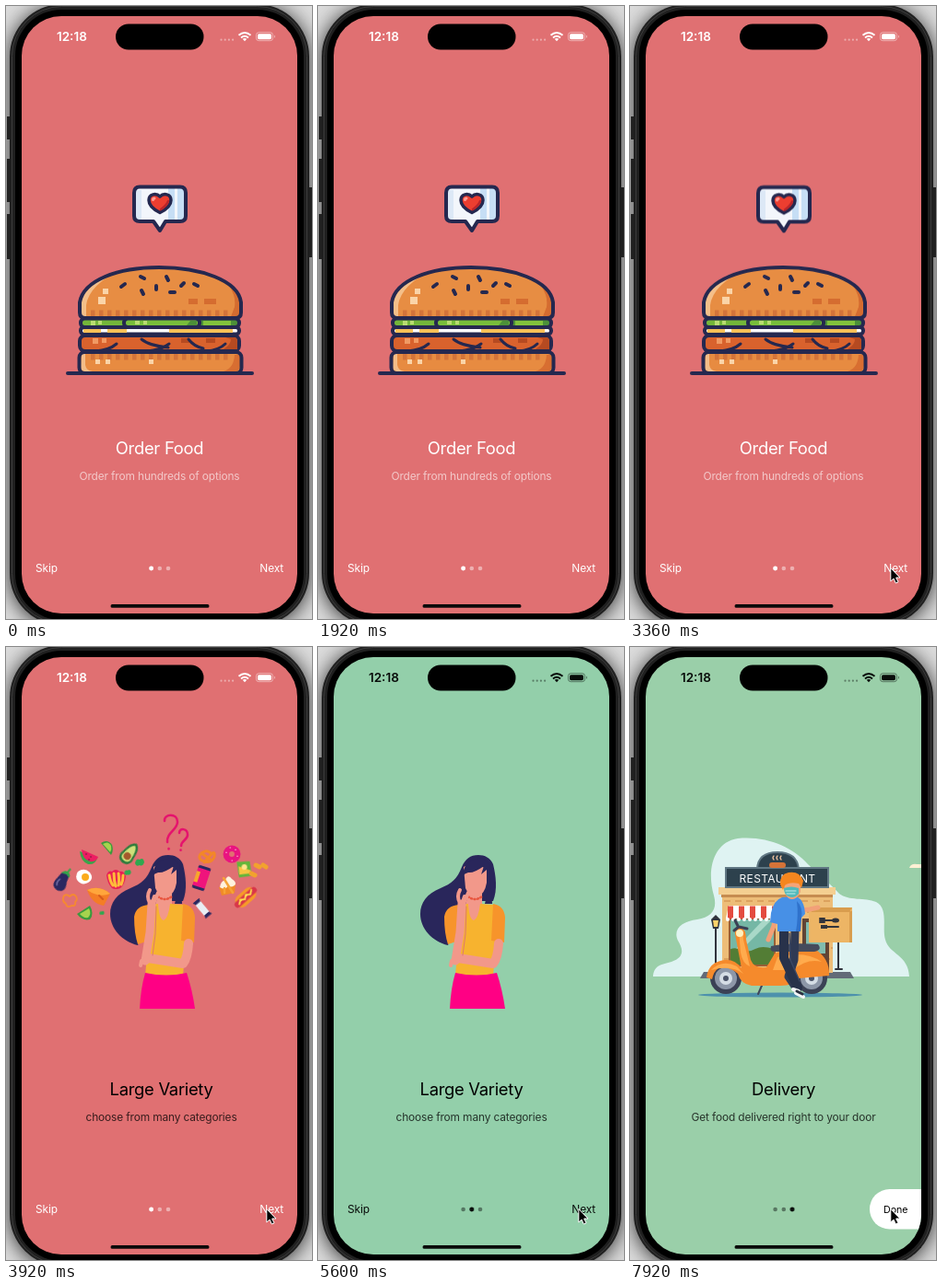
These frames come from a looping animation (332 px wide and 666 px high, 8000 ms). An HTML page:

```html
<!DOCTYPE html>
<html lang="en">
<head>
<meta charset="utf-8">
<title>Onboarding</title>
<style>
html, body { margin: 0; width: 100%; height: 100%; overflow: hidden; background: #999; }
svg { display: block; width: 332px; height: 666px; }
text { font-family: Inter, Roboto, sans-serif; }
.title { font-size: 18.4px; letter-spacing: -.28px; text-anchor: middle; }
.sub { font-size: 11.9px; letter-spacing: -.13px; text-anchor: middle; }
.nav { font-size: 11.9px; letter-spacing: -.1px; fill: currentColor; }
.ink { stroke: #25284f; stroke-width: 4; stroke-linejoin: round; stroke-linecap: round; }
.line { fill: none; stroke-linecap: round; stroke-linejoin: round; }

/* one shared 8 s clock: 1% = 80 ms */
.pages, .bg, .ui, .active, .early, .late, .cursor, .layer, .table, .bubble, .ring, .hair, .food, .ask, .cloud {
  animation: 8s linear infinite;
}
.pages { animation-name: swipe; }
@keyframes swipe {
  0%, 43.75% { transform: none; animation-timing-function: cubic-bezier(.3,0,.1,1); }
  49.75%, 92.5% { transform: translateX(-300px); animation-timing-function: cubic-bezier(.3,0,.1,1); }
  98.5%, 100% { transform: translateX(-600px); }
}
.bg { animation-name: tint; }
@keyframes tint {
  0%, 49.5% { fill: #e07072; }
  55%, 98.2% { fill: #93cfaa; }
  100% { fill: #a2cfa7; }
}
.ui { animation-name: ink; }
@keyframes ink {
  0%, 49.5% { color: #fff; }
  52%, 100% { color: #080c0a; }
}
.active { animation-name: dot; animation-timing-function: step-end; }
@keyframes dot {
  0% { transform: none; }
  49.6% { transform: translateX(9.2px); }
  98.5%, 100% { transform: translateX(18.4px); }
}
.early { animation-name: hide; animation-timing-function: step-end; }
.late { animation-name: show; animation-timing-function: step-end; }
@keyframes hide { 0% { opacity: 1; } 98.5%, 100% { opacity: 0; } }
@keyframes show { 0% { opacity: 0; } 98.5%, 100% { opacity: 1; } }
.cursor { animation-name: point; animation-timing-function: ease-out; }
@keyframes point {
  0%, 24% { transform: translate(60px, 30px); }
  30%, 100% { transform: none; }
}

.layer { animation-name: hop; transform-box: fill-box; transform-origin: center; }
@keyframes hop {
  0%, 10%, 22%, 42% { transform: none; animation-timing-function: ease-out; }
  16%, 48% { transform: translate(var(--x, 0px), var(--y)) rotate(var(--r, 0deg)); animation-timing-function: ease-in; }
  54%, 100% { transform: none; }
}
.table { animation-name: shrink; transform-origin: 167px 399px; }
@keyframes shrink {
  0%, 10%, 22%, 42%, 54%, 100% { transform: none; }
  16%, 48% { transform: scaleX(.89); }
}
.bubble { animation-name: bob; animation-timing-function: ease-in-out; }
@keyframes bob {
  0%, 24%, 40%, 100% { transform: translateY(-3px); }
  16%, 32%, 48% { transform: none; }
}
.ring { animation-name: burst; transform-box: fill-box; transform-origin: center; animation-timing-function: ease-out; }
@keyframes burst {
  0%, 28% { transform: scale(.15); opacity: 0; }
  28.5% { transform: scale(.2); opacity: 1; }
  32%, 33% { transform: none; opacity: 1; }
  36%, 100% { transform: scale(1.15); opacity: 0; }
}

.hair { animation-name: sway; transform-origin: 178px 240px; animation-timing-function: ease-in-out; }
@keyframes sway {
  0%, 49%, 70%, 100% { transform: none; }
  60%, 90% { transform: scaleX(1.07); }
}
.food { animation-name: pop; animation-delay: calc(var(--d) * -1ms); }
@keyframes pop {
  0%, 61% { transform: none; animation-timing-function: ease-in; }
  66%, 83% { transform: scale(0); animation-timing-function: cubic-bezier(.3,1.4,.6,1); }
  89%, 100% { transform: none; }
}
.ask { animation-name: fade; }
@keyframes fade { 0%, 53% { opacity: 1; } 57%, 100% { opacity: 0; } }
.cloud { animation-name: drift; }
@keyframes drift { 0%, 97% { transform: translateX(8px); } 99% { transform: none; } 100% { transform: translateX(-4px); } }
</style>
</head>
<body>
<svg viewBox="0 0 332 666" xmlns="http://www.w3.org/2000/svg">
  <defs>
    <clipPath id="screen"><rect x="17" y="11" width="299" height="649" rx="43"/></clipPath>
    <clipPath id="pane"><rect x="109" y="296" width="47" height="49"/></clipPath>
    <clipPath id="bun"><path d="M81 339V322C84 298 121 284 166 284S252 298 255 322V332Q255 339 248 339Z"/></clipPath>
    <filter id="soft" x="-20%" y="-20%" width="140%" height="140%"><feGaussianBlur stdDeviation="11"/></filter>
    <g id="leaf"><path fill="#2fa84f" d="M-5 1Q-4-5 0-3Q4-6 5 0Q3 5 0 3Q-4 5-5 1Z"/></g>
    <g id="wheel"><circle r="17" fill="#3b4155"/><circle r="12" fill="#8d97a8"/><circle r="7" fill="#d5dde5"/><circle r="3" fill="#4b5368"/></g>
  </defs>

  <rect width="332" height="666" fill="#dcdcdc"/>
  <rect x="4" y="0" width="325" height="675" rx="57" opacity=".8" filter="url(#soft)"/>
  <g fill="#202020">
    <path d="M1 120H6V145H1ZM1 166H6V213H1ZM1 226H6V275H1ZM327 197H332V273H327Z"/>
    <rect x="4" y="-2" width="325" height="675" rx="57"/>
  </g>
  <rect x="6.5" y=".5" width="320" height="670" rx="54" fill="none" stroke="#3c3c3c" stroke-width="1"/>
  <rect x="10" y="4" width="313" height="663" rx="50" fill="#000"/>

  <g clip-path="url(#screen)">
    <rect class="bg" x="17" y="11" width="299" height="649" fill="#e07072"/>

    <g class="pages">
      <!-- burger -->
      <g>
        <g class="bubble">
          <path fill="#f3f6fb" d="M144 200H190Q194 200 194 205V232Q194 236 189 236H173L167 247L160 236H144Q139 236 139 231V205Q139 200 144 200Z"/>
          <path fill="#c6def5" d="M176 200H183V236H176ZM186 200H190Q195 200 195 205V231Q195 236 190 236H186Z"/>
          <path fill="#dce8f6" d="M140 203H147V236H140Z"/>
          <path class="ink" fill="none" d="M145 199.500H189Q195 199.500 195 206V231Q195 237 189 237H173L167 247L160 237H145Q139 237 139 231V206Q139 199.500 145 199.500Z"/>
          <path class="ink" style="stroke-width:3.500" fill="#ec3e30" d="M167 227.500C160 224 155 219 155 214C155 207 163 206 167 210C171 206 179 207 179 214C179 219 174 224 167 227.500Z"/>
          <path class="line" stroke="#ff9b92" stroke-width="3" d="M159.500 213.500Q159.500 212 161 212"/>
          <path class="line" stroke="#b9252a" stroke-width="2.500" d="M176 215Q174 220 168 224"/>
        </g>
        <g class="line" stroke="#25284f" stroke-width="4">
          <circle class="ring" cx="88" cy="238" r="19" pathLength="8" stroke-dasharray="0 1"/>
          <circle class="ring" cx="245.500" cy="238" r="19" pathLength="8" stroke-dasharray="0 1"/>
        </g>
        <path class="ink table" d="M67 399H267"/>
        <g class="layer" style="--y:-9.500px">
          <rect x="80" y="376" width="175" height="23" rx="6" fill="#e78b41"/>
          <path fill="#f3bd89" d="M82 378H86V390Q87 396 94 397H86Q81 397 81 391Z"/>
          <path fill="#d86e31" d="M254 379V391Q253 398 246 398H232Q247 396 248 379Z"/>
          <path class="line" stroke="#d4743a" stroke-width="7" style="stroke-linecap:butt" stroke-dasharray="4.500 4.500" d="M92 381H242"/>
          <path fill="#fad4a8" d="M97 384h5v5h-5ZM108 384h5v5h-5ZM155 384h5v5h-5Z"/>
          <rect class="ink" x="79.500" y="376" width="176" height="23" rx="6" fill="none"/>
        </g>
        <g class="layer" style="--y:-14.500px">
          <rect class="ink" x="80" y="358" width="173" height="17" rx="6" fill="#d9622d"/>
          <path fill="#b64a21" d="M190 361H199V366H190ZM217 361H227V366H217ZM238 360H248Q251 360 251 366V373H236Q244 368 244 362Z"/>
          <path fill="#f19a63" d="M94 361h6v6h-6ZM104 361h5v5h-5Z"/>
          <path class="ink line" style="stroke-width:3" d="M97 375Q112 374 120 367M147 362Q155 369 176 371M153 375Q168 374 177 367M198 362Q204 370 214 372M217 375Q231 374 238 367"/>
        </g>
        <g class="layer" style="--y:-10.500px;--r:-1.500deg">
          <rect class="ink" x="81" y="349" width="172" height="7.500" rx="3.500" fill="#fff"/>
          <path fill="#f8c057" d="M84 351H103V355H84ZM110 351H131V355H110ZM177 351H246V355H177Z"/>
        </g>
        <g class="layer" style="--y:-17px;--r:-6deg">
          <rect class="ink" x="81" y="339.500" width="88" height="9.500" rx="4.500" fill="#74b63a"/>
          <path fill="#b9dd72" d="M92 342h5v5h-5ZM100 342h4v4h-4Z"/>
        </g>
        <g class="layer" style="--y:-13px">
          <rect class="ink" x="165" y="339.500" width="88" height="9.500" rx="4.500" fill="#4c9039"/>
          <path fill="#82c23c" d="M214 342H244V347H214Z"/>
        </g>
        <g class="layer" style="--y:-14px">
          <rect class="ink" x="128" y="339.500" width="82" height="9.500" rx="4.500" fill="#78be3b"/>
          <path fill="#b9dd72" d="M140 342h5v4h-5ZM149 342h4v4h-4Z"/>
          <path fill="#4c9039" d="M200 342H207V347H196Z"/>
        </g>
        <g class="layer" style="--x:1.800px;--y:-20px;--r:1.800deg">
          <g clip-path="url(#bun)">
            <rect x="78" y="282" width="180" height="60" fill="#e78d43"/>
            <path fill="#f4bf8a" d="M80 340V318Q90 292 125 286Q90 303 87 325V340Z"/>
            <path fill="#d56c30" d="M225 288Q251 306 248 327L243 340H258V300Z"/>
            <path stroke="#d4743a" stroke-width="7" stroke-dasharray="4.500 4.500" d="M92 334H242"/>
          </g>
          <path fill="#fad4a8" d="M105 307h6v6h-6ZM100 316h8v8h-8Z"/>
          <path fill="#d56c30" d="M198 318h10v6h-10ZM215 318h13v6h-13Z"/>
          <path class="ink line" d="M125 305L129 302M146 294L150 296M147 309L149 313M163 304V308M174 294L176 298M178 311H183M190 304L193 301M204 302L208 304"/>
          <path class="ink" fill="none" d="M80 333V322C84 298 121 284 166 284S252 298 255 322V333Q255 339 249 339H86Q80 339 80 333Z"/>
        </g>
        <text class="title" x="166.500" y="487" fill="#fff">Order Food</text>
        <text class="sub" x="166.500" y="515" fill="#fff" fill-opacity=".62">Order from hundreds of options</text>
      </g>

      <!-- variety -->
      <g transform="translate(300 0)">
        <g class="ask line" stroke="#e5126d" stroke-width="2.500">
          <path d="M170 189C169 181 184 180 184 190C184 199 172 201 173 212M174.500 219v.5"/>
          <path d="M186 202C186 196 195 197 195 204C195 210 188 210 188 216M187.500 220.500v.2"/>
        </g>
        <g transform="translate(88 227)"><g class="food" style="--d:380">
          <path fill="#3aa54a" d="M-10-5L9 2Q7 10-1 9Q-9 6-10-5Z"/><path fill="#ec1e62" d="M-8-7L10 1Q8 7 1 6Q-7 4-8-7Z"/>
          <path class="line" stroke="#5a1739" stroke-width="1.500" d="M-3-2v.1M2 1v.1M0 4v.1"/></g></g>
        <g transform="translate(107 218)"><g class="food" style="--d:120">
          <path fill="#389a3c" d="M-6-5Q1-10 6-3Q8 4 5 8Z"/><path fill="#a6d34e" d="M-4-4Q2-8 5-2Q6 2 4 5Z"/></g></g>
        <g transform="translate(132 224) rotate(38)"><g class="food" style="--d:300">
          <path fill="#2d7c3c" d="M0-13Q6-11 7 1Q10 12 0 13Q-10 12-7 1Q-6-11 0-13Z"/><path fill="#cfe07a" d="M0-10Q4-8 5 2Q7 10 0 10Q-7 10-5 2Q-4-8 0-10Z"/><circle cy="4" r="4" fill="#a5592b"/></g></g>
        <g transform="translate(60 252) rotate(28)"><g class="food" style="--d:340">
          <path fill="#2b2860" d="M0-9Q5-7 5 1Q10 13 0 14Q-10 13-6 1Q-5-7 0-9Z"/><path fill="#35a34a" d="M-5-5Q-2-10 0-9L1-14L3-13L2-9Q6-7 5-4L1-6Z"/><path class="line" stroke="#7771a7" stroke-width="1.500" d="M-3 2Q-5 6-3 9"/></g></g>
        <g transform="translate(83 249)"><g class="food" style="--d:260">
          <path fill="#fff" d="M-7-5Q0-10 6-4Q11 3 4 7Q-3 11-8 4Q-10-1-7-5Z"/><circle cx="1" cy="1" r="4" fill="#fbab1c"/></g></g>
        <g transform="translate(117 252)"><g class="food" style="--d:60">
          <path fill="#e91d55" d="M-10-4Q-8-10-4-8Q0-12 4-8Q9-9 11-3Q10 6 5 10Q0 12-4 10Q-9 5-10-4Z"/>
          <path class="line" stroke="#ffbd3a" stroke-width="3" d="M-7-4Q-6 3-3 7M-2-6Q-2 2 0 8M3-6Q4 2 3 7M8-4Q8 2 6 6"/></g></g>
        <g transform="translate(67 275)"><g class="food" style="--d:240">
          <path class="line" stroke="#f58a31" stroke-width="1.800" d="M-6-5Q-3-7 0-4Q4-8 7-4Q9 0 6 2Q7 7 2 6Q-3 9-4 4Q-9 1-6-5Z"/></g></g>
        <g transform="translate(99 270)"><g class="food" style="--d:140">
          <path fill="#f47d25" d="M-13-6Q0-12 12-2L5 11Q-8 9-13-6Z"/><path fill="#ffa63c" d="M-13-6Q0-12 12-2Q0 3-13-6Z"/><path class="line" stroke="#d65a1c" stroke-width="2" d="M0 0L4 4"/></g></g>
        <g transform="translate(84 289)"><g class="food" style="--d:200">
          <path fill="#389a3c" d="M-9 1L5-8Q10 1 5 7Q-3 9-9 1Z"/><path fill="#a6d34e" d="M-6 1L4-5Q7 1 3 5Q-2 6-6 1Z"/></g></g>
        <g transform="translate(143 234)"><g class="food" style="--d:20"><use href="#leaf"/></g></g>
        <g transform="translate(130 245) scale(.75)"><g class="food" style="--d:40"><use href="#leaf"/></g></g>
        <g transform="translate(102 289) scale(.55)"><g class="food" style="--d:80"><use href="#leaf"/></g></g>
        <g transform="translate(216 228)"><g class="food" style="--d:280">
          <path class="line" stroke="#f38728" stroke-width="3" d="M-3 6L5-3Q9-7 8 0Q5 7-2 5Q-9 4-8-1Q-7-5-3-2L5 4M-6-4Q0-9 5-3"/></g></g>
        <g transform="translate(243 225)"><g class="food" style="--d:360">
          <circle r="6.200" fill="none" stroke="#e91480" stroke-width="6.500"/><path class="line" stroke="#ffc3dd" stroke-width="1.200" d="M-6-2v.5M-2-7h.5M4-5v.5M6 2v.5M0 7h.5"/></g></g>
        <g transform="translate(210 251) rotate(18)"><g class="food" style="--d:160">
          <rect x="-7" y="-13" width="14" height="26" rx="2" fill="#2b2860"/><rect x="-7" y="-10" width="14" height="20" fill="#ef147c"/><path fill="#f7a62c" d="M-7-6H-3V6H-7Z"/></g></g>
        <g transform="translate(238 258)"><g class="food" style="--d:220">
          <path fill="#f08b27" d="M-9 3L9-1L8 9L-6 12Z"/><path fill="#fff2de" d="M-8 3Q-7-4-2-5Q1-12 5-6Q11-2 8 1Q3 4 1 1Q-2 7-8 3Z"/><path class="line" stroke="#f6a335" stroke-width="2.500" d="M-4-7L6 9M-3 4V9"/></g></g>
        <g transform="translate(257 241) rotate(-12)"><g class="food" style="--d:320">
          <path fill="#62b63a" d="M-7-9L7-7L6 9L-8 8Z"/><path fill="#f8c642" d="M-6-4L6 3L5 6L-7 5Z"/><circle cy="-2" r="3" fill="#ffe58a"/></g></g>
        <g transform="translate(273 240)"><g class="food" style="--d:300">
          <path class="line" stroke="#f2a22e" stroke-width="5" d="M-9 6L-5 8M-4-3L0-1M4-3L7-1"/></g></g>
        <g transform="translate(258 272) rotate(-42)"><g class="food" style="--d:260">
          <rect x="-13" y="-7" width="26" height="14" rx="7" fill="#f69a29"/><rect x="-15" y="-3.500" width="30" height="7" rx="3.500" fill="#d93649"/><path class="line" stroke="#ffe04f" stroke-width="1.800" d="M-10 1L-6-2L-2 1L2-2L6 1L10-2"/></g></g>
        <g transform="translate(211 284) rotate(50) scale(.9)"><g class="food" style="--d:100">
          <path fill="#2b2860" d="M-12-5L-7-3H7L12-5V5L7 3H-7L-12 5Z"/><rect x="-8" y="-4" width="16" height="8" fill="#e9eef4"/></g></g>

        <path class="hair" fill="#29265b" d="M174 226C165 226 160 230 156 239C151 252 145 257 133 262C118 268 111 278 111 290C111 306 124 320 141 324L155 297L169 276H190C195 264 193 248 190 236C187 229 181 226 174 226Z"/>
        <path fill="#f2988a" d="M164 265H178V281Q175 299 168 299Q162 296 160 280Z"/>
        <path fill="#f7b32f" d="M155 280L163 279Q164 296 169 297Q174 295 176 279L191 280Q195 312 192 333L190 357H149L152 322Z"/>
        <path fill="#f7942b" d="M153 280Q139 281 137 293Q137 311 141 323L153 319ZM190 279Q202 281 203 294L202 321L188 319Z"/>
        <path fill="#f2988a" d="M158 239Q161 237 172 236L183 241V256Q181 268 173 272Q164 272 160 262Z"/>
        <path fill="#29265b" d="M157 249Q158 234 169 231L178 229L186 236L189 279H181Q185 265 183 252V242L177 247L180 238Q169 246 163 245Q159 246 157 249Z"/>
        <path class="line" stroke="#e8563f" stroke-width="2.500" stroke-dasharray="1 2.600" d="M163 271Q170 277 178 271"/>
        <path fill="#ff0084" d="M149 354Q172 359 194 354Q200 372 203 393H143Q144 371 149 354Z"/>
        <path class="line" stroke="#f2988a" stroke-width="10" d="M196 322Q195 338 190 344L152 338"/>
        <path class="line" stroke="#f2988a" stroke-width="9" d="M149 341L154 310L156 279"/>
        <path class="line" stroke="#f2988a" stroke-width="4" d="M154 278Q150 271 154 264M158 279L163 267M157 277L159 271M153 337L145 341L144 346"/>
        <path class="line" stroke="#dd796f" stroke-width="1" d="M157 335L160 312L161 282"/>
        <text class="title" x="166.500" y="487">Large Variety</text>
        <text class="sub" x="166.500" y="515" fill-opacity=".75">choose from many categories</text>
      </g>

      <!-- delivery -->
      <g transform="translate(600 0)">
        <path fill="#dff3f2" d="M25 358C26 345 35 345 45 342C59 337 58 329 52 319C46 306 57 298 73 296C89 293 95 285 91 270C83 243 90 212 117 208C148 205 176 217 193 236C208 250 217 257 227 268C237 276 255 272 267 277C281 284 273 306 277 318C281 334 302 334 303 358Z"/>
        <path class="cloud" fill="#fff0d4" d="M303 240Q305 235 311 236H326V240Z"/>
        <path fill="#626b78" d="M80 353H239L243 360H76Z"/>
        <path fill="#edbd78" d="M100 264H220V354H100Z"/>
        <path stroke="#dca25e" stroke-width="2" stroke-dasharray="7 5" d="M102 276H220M108 288H220M158 327H220M102 339H220"/>
        <path fill="#f4cf91" d="M96 261H223V269H96Z"/>
        <path fill="#c68c50" d="M99 269H220V272H99Z"/>
        <path fill="#2d414d" stroke="#607783" stroke-width="2" d="M138 241Q139 223 160 223T183 241Z"/>
        <rect x="104" y="240" width="111" height="21" fill="#2d414d" stroke="#607783" stroke-width="2"/>
        <path class="line" stroke="#d57338" stroke-width="6" d="M154 237H166"/>
        <path class="line" stroke="#f2c4a0" stroke-width="1.200" d="M156 231Q154 229 156 227M160 231Q158 229 160 227M164 231Q162 229 164 227"/>
        <text x="160" y="255.500" font-size="12" letter-spacing=".4" text-anchor="middle" fill="#fff">RESTAURANT</text>
        <rect x="107" y="294" width="51" height="53" fill="#985f37"/>
        <g clip-path="url(#pane)"><rect x="109" y="296" width="47" height="49" fill="#75b7a5"/><path fill="#a9d8c8" d="M113 330L145 296H154L120 330Z"/><path fill="#537d35" d="M106 330Q113 325 120 329T136 328T160 330V346H106Z"/></g>
        <path fill="#fff" d="M107 281H156L159 295H104Z"/>
        <path stroke="#e44b3f" stroke-width="14" stroke-dasharray="6 6" d="M106 288.500H158"/>
        <path class="line" stroke="#fff" stroke-width="4" stroke-dasharray="0 6" d="M106 296H158"/>
        <path fill="#614435" d="M187 295H216V353H187Z"/>
        <path fill="#81bcae" d="M191 299H212V333H191Z"/>
        <path class="line" stroke="#30343d" stroke-width="2" d="M93 304V348M90 348H96M226 320V350M223 350H230"/>
        <path fill="#30343d" d="M88 296L93 291L98 296L96 306H90Z"/><path fill="#ffd36a" d="M90 297H96L95 304H91Z"/>

        <ellipse cx="163" cy="378" rx="89" ry="2.500" fill="#4d91ac"/>
        <use href="#wheel" x="104" y="360"/><use href="#wheel" x="197" y="360"/>
        <path class="line" stroke="#40465a" stroke-width="2" d="M146 361L139 377"/>
        <path fill="#f58a2c" d="M83 359Q85 342 103 340Q114 339 121 349L114 312Q113 304 119 304Q126 306 126 318L131 340Q135 350 148 348L157 333Q174 326 200 328Q217 338 216 357L183 360Q177 369 160 368H132Q120 366 117 355Q107 346 96 349Q91 352 89 361Z"/>
        <path fill="#ffab4d" d="M88 351Q100 339 116 347L123 355Q110 345 88 351ZM118 307Q123 307 123 318L130 347Q122 344 120 332ZM160 337Q189 329 208 342Q192 338 177 351H155Z"/>
        <path fill="#454b5c" d="M153 325Q173 321 204 323Q209 329 200 331H157Q151 331 153 325Z"/>
        <path class="line" stroke="#3b4155" stroke-width="3" d="M113 308L118 304L127 306M117 303L114 297"/>
        <circle cx="119" cy="311" r="4" fill="#fff0bd"/>

        <path fill="#edb565" d="M194 283H241V321H194Z"/>
        <path fill="#d99d4e" d="M194 283H241L238 288H197ZM238 287H241V321H238Z"/>
        <path class="line" stroke="#32343b" stroke-width="2" d="M206 297H225M206 295H211M206 299H211M212 304H226"/>
        <ellipse cx="223" cy="297" rx="4" ry="2.500" fill="#32343b"/><path fill="#32343b" d="M207 302H214V306H207Z"/>

        <path class="line" stroke="#2f3a54" stroke-width="9" d="M179 308L178 340L172 358L180 370"/>
        <path class="line" stroke="#28324a" stroke-width="10" d="M167 308L167 338L182 370"/>
        <path class="line" stroke="#3b4864" stroke-width="1.500" d="M173 311L174 340L184 363"/>
        <path class="line" stroke="#f3f5f7" stroke-width="4" d="M180 376L188 380M177 372L183 374"/>
        <path class="line" stroke="#2b3040" stroke-width="3" d="M181 374L187 377"/>
        <path class="line" stroke="#f2a078" stroke-width="5" d="M158 288L156 303L150 318M184 286L195 285L204 283"/>
        <path fill="#4790e6" d="M165 272Q156 275 153 289L152 299L160 301V309H185V295L190 290Q189 274 180 271Z"/>
        <path fill="#2f72cc" d="M181 276Q188 283 186 295L185 309H180Q183 292 181 276Z"/>
        <path fill="#f3a479" d="M167 252H185V266Q180 277 172 273Q166 268 167 252Z"/>
        <path fill="#52b9ba" d="M167 262Q175 259 183 262V268Q178 274 172 271Q167 269 167 262Z"/>
        <path class="line" stroke="#c4eceb" stroke-width="1" d="M169 265H180M170 268H179"/>
        <path fill="#f5861f" d="M163 258Q162 247 172 245Q184 243 188 254L186 262L183 257Q173 255 168 259L166 264Z"/>
        <text class="title" x="166.500" y="487">Delivery</text>
        <text class="sub" x="166.500" y="515" fill-opacity=".75">Get food delivered right to your door</text>
      </g>
    </g>

    <g class="ui" fill="currentColor">
      <text x="55" y="38" font-size="13.500" font-weight="600">12:18</text>
      <path class="line" stroke="currentColor" stroke-opacity=".42" stroke-width="2.200" stroke-dasharray="0 4.200" d="M233.500 36.700H247"/>
      <path class="line" stroke="currentColor" stroke-width="2" style="stroke-linecap:butt" d="M252.500 31.800Q259 26.200 265.500 31.800M255 34.500Q259 31 263 34.500"/>
      <path d="M256.700 35.800Q259 34 261.300 35.800L259 38.200Z"/>
      <rect x="271.500" y="28.700" width="18" height="9" rx="2.800" fill="none" stroke="currentColor" stroke-opacity=".45"/>
      <rect x="273" y="30.200" width="15" height="6" rx="1.600"/>
      <path fill-opacity=".5" d="M291 31.500Q293 33.200 291 35Z"/>
      <g class="early"><text class="nav" x="32" y="615">Skip</text><text class="nav" x="275.300" y="615">Next</text></g>
      <g fill-opacity=".45"><circle cx="157.600" cy="611" r="2.300"/><circle cx="166.800" cy="611" r="2.300"/><circle cx="176" cy="611" r="2.300"/></g>
      <circle class="active" cx="157.600" cy="611" r="2.400"/>
    </g>
    <g class="late">
      <rect x="260" y="589" width="80" height="43.500" rx="21.700" fill="#fff"/>
      <text x="275" y="614.500" font-size="10.700" letter-spacing="-.05">Done</text>
    </g>
    <rect x="113.500" y="650" width="107" height="3.800" rx="1.900" fill="#0a0a0a"/>
    <path class="cursor" d="M282.800 610.500V625L286 622L288.300 627L291 625.800L288.700 621H293Z" stroke="#fff" stroke-width="1" stroke-linejoin="round"/>
  </g>
  <rect x="119" y="19.500" width="95.500" height="28" rx="14"/>
</svg>
</body>
</html>
```
